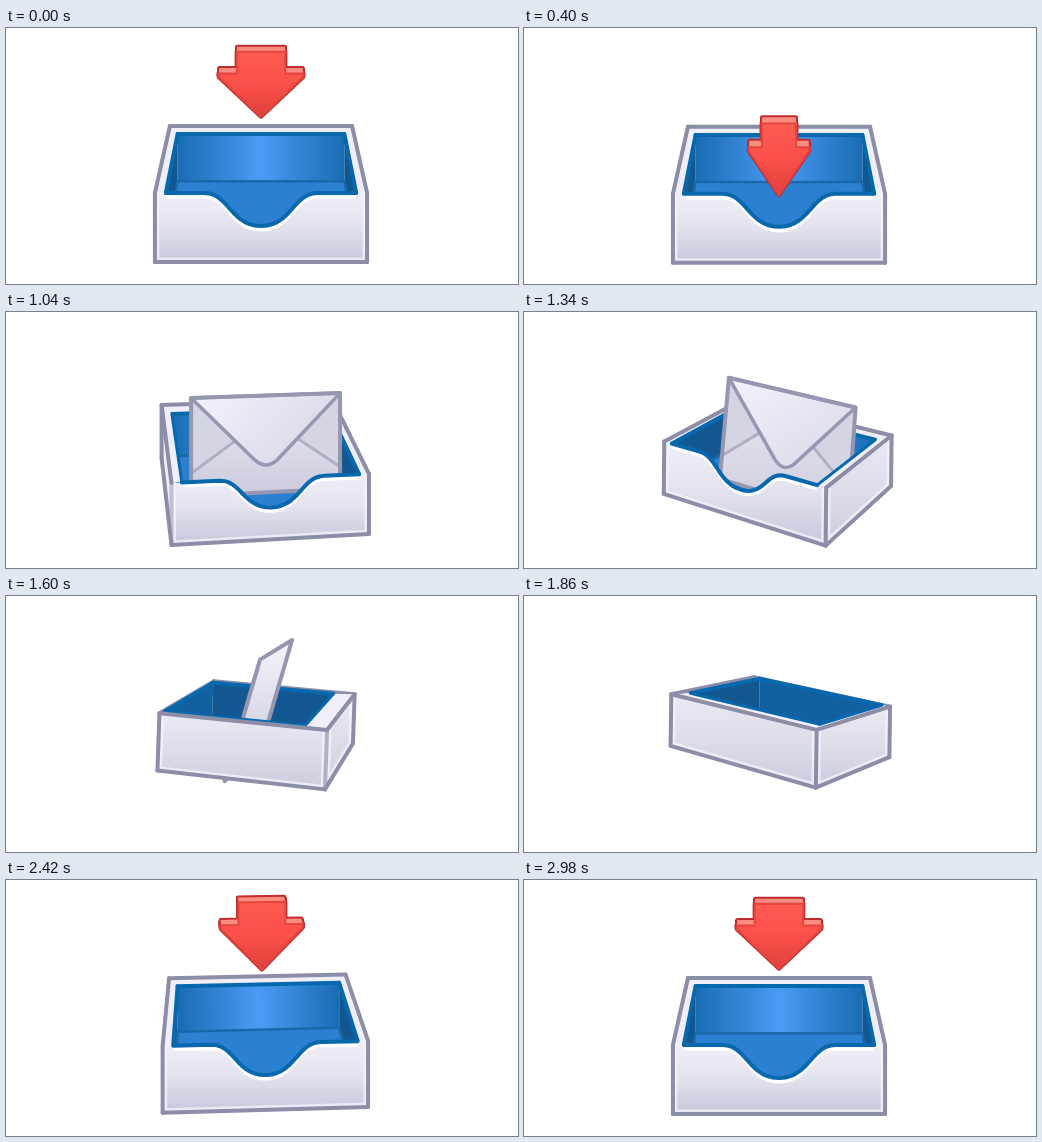
Write an HTML page with a canvas that moves like this. It is 512x256 px and loops after 3 s.

```html
<!DOCTYPE html>
<html lang="en">
<head>
<meta charset="utf-8">
<title>Inbox</title>
<style>
html, body { margin: 0; width: 100%; height: 100%; overflow: hidden; background: #fff; }
canvas { display: block; width: 512px; height: 256px; }
</style>
</head>
<body>
<canvas id="stage" width="512" height="256"></canvas>
<script>
const ctx = document.getElementById('stage').getContext('2d');
const LOOP = 3000, FOCAL = 1050;
const W = 98, D = 80, H = 35.6;
const GREY = '#8c8da7', RIM = '#f0eff9', BLUE = '#0768ad';

// Each track is [time, value] pairs joined by a smooth curve.
const tracks = {
  yaw: [[0, 0], [780, 0], [1000, -10], [1040, -9], [1200, 4], [1350, 32], [1600, 102], [1850, 210],
        [2100, 315], [2250, 349], [2420, 357], [2650, 360], [3000, 360]],
  cx: [[0, 255], [640, 255], [1040, 253], [1350, 256], [1600, 257.5], [2100, 257.4], [2420, 255.5], [2700, 255], [3000, 255]],
  cy: [[0, 160.8], [180, 159.5], [420, 162], [560, 178], [640, 160.5], [720, 154], [820, 160], [940, 158],
       [1040, 153.5], [1250, 159], [1400, 146], [1600, 133.5], [1900, 130], [2100, 136.6], [2260, 172],
       [2420, 158], [2560, 161.5], [2700, 160.8], [3000, 160.8]],
  zoom: [[0, 1], [640, 1], [1040, .945], [1350, .91], [1600, .98], [1720, .88], [2100, .86], [2260, .94], [2420, .97], [2700, 1], [3000, 1]],
  tilt: [[0, .447], [420, .447], [560, .42], [640, .397], [760, .41], [1040, .53], [1250, .48], [1600, .216],
         [1850, .25], [2100, .3725], [2260, .45], [2420, .46], [2700, .447], [3000, .447]],
  tall: [[0, 1], [420, 1], [560, .9], [640, .99], [1040, .99], [1600, .78], [1850, .85], [2100, .97], [2260, .9], [2420, 1], [3000, 1]],
  roll: [[0, 0], [1200, 0], [1600, .035], [2050, 0], [3000, 0]],
  skew: [[0, 0], [780, 0], [1040, .04], [1600, .02], [2100, .1], [2420, 0], [3000, 0]],
  tip: [[0, 84], [200, 98], [300, 72], [420, -10], [500, -20], [1820, -20], [2000, 36], [2100, 54], [2300, 86],
        [2420, 83], [2600, 86], [2760, 84], [3000, 84]],
  arrowTall: [[0, 1], [200, 1.05], [360, 1.25], [440, .8], [500, 0], [1840, 0], [1980, 1.1], [2100, 1.4], [2260, 1],
              [2420, 1.08], [2620, 1], [3000, 1]],
  arrowWide: [[0, 1], [200, 1], [360, .85], [500, .3], [1840, .3], [2000, .9], [2100, 1], [3000, 1]],
  mail: [[0, -34], [440, -34], [540, 60], [640, 86.6], [720, 92], [820, 85], [1040, 87], [1600, 86], [1660, 78], [1800, -34], [3000, -34]],
  mailX: [[0, 2], [640, 2], [1040, 8], [3000, 2]],
  lean: [[0, 0], [1040, 0], [1600, -13], [1800, 0], [3000, 0]]
};

function sample(keys, t) {
  let i = 0;
  while (i < keys.length - 2 && t >= keys[i + 1][0]) i++;
  const slope = j => (keys[j + 1][1] - keys[j][1]) / (keys[j + 1][0] - keys[j][0]);
  const tangent = j => {
    if (j === 0 || j === keys.length - 1) return 0;
    const a = slope(j - 1), b = slope(j);
    return a * b <= 0 ? 0 : 2 * a * b / (a + b);
  };
  const [t0, a] = keys[i], [t1, b] = keys[i + 1];
  const d = t1 - t0, u = (t - t0) / d, w = 1 - u;
  return a * (1 + 2 * u) * w * w + tangent(i) * d * u * w * w
       + b * u * u * (3 - 2 * u) - tangent(i + 1) * d * u * u * w;
}

let p, sin, cos, lift;

function setPose(t) {
  p = {};
  for (const name in tracks) p[name] = sample(tracks[name], t);
  const a = p.yaw * Math.PI / 180;
  sin = Math.sin(a);
  cos = Math.cos(a);
  lift = Math.sqrt(1 - p.tilt * p.tilt);
}

function at(x, y, z) {
  const far = x * sin + z * cos;
  const m = p.zoom * FOCAL / (FOCAL - far);
  const px = (x * cos - z * sin) * m;
  const py = (far * p.tilt - y * lift) * m + px * p.skew;
  const c = Math.cos(p.roll), s = Math.sin(p.roll);
  return [p.cx + px * c - py * s, p.cy + px * s + py * c];
}

function path(pts, closed = true) {
  ctx.beginPath();
  pts.forEach(q => ctx.lineTo(q[0], q[1]));
  if (closed) ctx.closePath();
}

function fill(pts, style) {
  path(pts);
  ctx.fillStyle = style;
  ctx.fill();
}

function stroke(style, width) {
  ctx.strokeStyle = style;
  ctx.lineWidth = width;
  ctx.stroke();
}

function line(pts, style, width, alpha = 1) {
  ctx.globalAlpha = alpha;
  path(pts, false);
  stroke(style, width);
  ctx.globalAlpha = 1;
}

function blend(a, b, ...colors) {
  const g = ctx.createLinearGradient(a[0], a[1], b[0], b[1]);
  colors.forEach((c, i) => g.addColorStop(i / (colors.length - 1), c));
  return g;
}

function vertical(pts, ...colors) {
  const ys = pts.map(q => q[1]);
  return blend([0, Math.min(...ys)], [0, Math.max(...ys)], ...colors);
}

function turn(a, b, c) {
  return (b[0] - a[0]) * (c[1] - b[1]) - (b[1] - a[1]) * (c[0] - b[0]);
}

const ring = (x, y, back, front) =>
  [[-x, back], [x, back], [x, front], [-x, front]].map(([cx, cz]) => at(cx, y, cz));

// Rim of the front wall with its dip, from right to left.
function dip(half, y) {
  const pts = [at(half, y, D)];
  const depth = 34 * p.tall;
  for (const side of [1, -1]) {
    for (let i = 0; i <= 14; i++) {
      const u = side > 0 ? i / 14 : 1 - i / 14, w = 1 - u;
      const x = 52 * w * w * w + 90 * w * w * u + 84 * w * u * u;
      pts.push(at(side * x, y - depth * u * u * (3 - 2 * u), D));
    }
  }
  pts.push(at(-half, y, D));
  return pts;
}

function drawArrow() {
  if (p.arrowTall < .02) return;
  const shape = [[-24, 72], [24, 72], [24, 48], [42, 48], [42, 44], [0, 0], [-42, 44], [-42, 48], [-24, 48]];
  const put = ([x, y], z) => at(x * p.arrowWide, p.tip + y * p.arrowTall, z);
  const slice = z => shape.map(q => put(q, z));
  const face = cos >= 0 ? 8 : -8;
  for (let i = -4; i <= 4; i++) {
    const pts = slice(face * i / 4);
    fill(pts, '#c93331');
    stroke('#c02d2d', 4);
  }
  for (const [a, b] of [[7, 8], [2, 3], [0, 1]]) {
    fill([put(shape[a], -face), put(shape[b], -face), put(shape[b], face), put(shape[a], face)], '#fa8c82');
  }
  const front = slice(face);
  fill(front, vertical(front, '#fe5b52', '#fb5049', '#df403c'));
  stroke('#e5453f', 2);
}

function drawMail() {
  if (p.mail < -30) return;
  const put = (x, v) => {
    const y = p.mail - (p.mail + 34) * v;
    return at(x + p.mailX, y, p.lean * (y - 35) / 52);
  };
  const body = [put(-80, 0), put(80, 0), put(80, 1), put(-80, 1)];
  fill(body, vertical(body, '#f5f4fc', '#dcdce9', '#cacadc'));
  if (cos > 0) {
    for (const s of [-1, 1]) {
      fill([put(s * 80, 0), put(s * 34, .46), put(s * 80, .77)], '#d4d4e3');
      line([put(s * 34, .46), put(s * 80, .77)], '#b0b0c5', 3);
    }
    const a = put(-80, 0), b = put(80, 0), l = put(-12, .665), r = put(12, .665), c = put(0, .77);
    ctx.beginPath();
    ctx.moveTo(...a);
    ctx.lineTo(...l);
    ctx.quadraticCurveTo(...c, ...r);
    ctx.lineTo(...b);
    ctx.closePath();
    ctx.fillStyle = blend(a, c, '#f3f2fb', '#dedeec');
    ctx.fill();
    stroke('#9697b0', 3.5);
  }
  path(body);
  stroke('#9596af', 4);
}

function drawBox() {
  const h = H * p.tall;
  const top = ring(W, h, -D, D), base = ring(W, -h, -D, D);
  const lip = ring(88, h, -58, 78), floor = ring(88, -.56 * h, -58, 78);
  const sides = [0, 1, 2, 3];
  const next = i => (i + 1) % 4;
  const near = sides.map(i => turn(top[i], top[next(i)], base[next(i)]) < 0);

  fill(top, RIM);
  sides.filter(i => !near[i]).forEach(i => line([top[i], top[next(i)]], GREY, 4));

  // Inside
  fill(floor, '#2b80d1');
  for (const i of [2, 1, 3, 0]) {
    const j = next(i);
    if (turn(lip[i], lip[j], floor[j]) <= 0) continue;
    const paint = i === 0 ? blend(lip[0], lip[1], '#196cb2', '#4b9bf5', '#196cb2')
                : i === 2 ? '#11609f' : '#12578f';
    fill([lip[i], lip[j], floor[j], floor[i]], paint);
    line([floor[i], floor[j]], '#1a67aa', 2.5);
  }
  sides.filter(i => !near[i]).forEach(i => line([lip[i], lip[next(i)]], BLUE, 4));

  drawMail();
  drawArrow();

  // Outside
  for (const i of sides) {
    if (!near[i] || i === 2) continue;
    const j = next(i);
    fill([top[i], top[j], lip[j], lip[i]], RIM);
    line([lip[i], lip[j]], BLUE, 3);
  }
  for (const i of [0, 1, 3, 2]) {
    if (!near[i]) continue;
    const j = next(i);
    const rim = i === 2 ? dip(W, h) : [top[i], top[j]];
    const wall = [...rim, base[j], base[i]];
    const paint = i === 2 ? vertical(wall, '#f1f0f9', '#e2e2ee', '#c5c6d9')
                          : vertical(wall, '#eae9f4', '#dddde9', '#cbcbdd');
    fill(wall, paint);
    ctx.save();
    ctx.clip();
    line([top[j], base[j], base[i], top[i]], '#f5f5fc', 9, .75);
    ctx.restore();
  }
  for (const i of sides) {
    if (!near[i]) continue;
    const j = next(i);
    line([base[i], base[j]], GREY, 4);
    if (i !== 2) line([top[i], top[j]], GREY, 4);
    for (const [corner, beside] of [[i, (i + 3) % 4], [j, j]]) {
      const shared = near[beside];
      if (shared && corner === i) continue;
      const alpha = shared ? Math.min(1, 3 * Math.min(Math.abs(sin), Math.abs(cos))) : 1;
      line([top[corner], base[corner]], GREY, 4, alpha);
    }
  }
  if (near[2]) {
    line(dip(86, h - 4), '#ffffff', 3.5);
    line(dip(88, h), BLUE, 4);
  }
}

let start;
function frame(now) {
  if (start === undefined) start = now;
  setPose((now - start) % LOOP);
  ctx.fillStyle = '#fff';
  ctx.fillRect(0, 0, 512, 256);
  ctx.lineJoin = ctx.lineCap = 'round';
  drawBox();
  requestAnimationFrame(frame);
}
requestAnimationFrame(frame);
</script>
</body>
</html>
```
